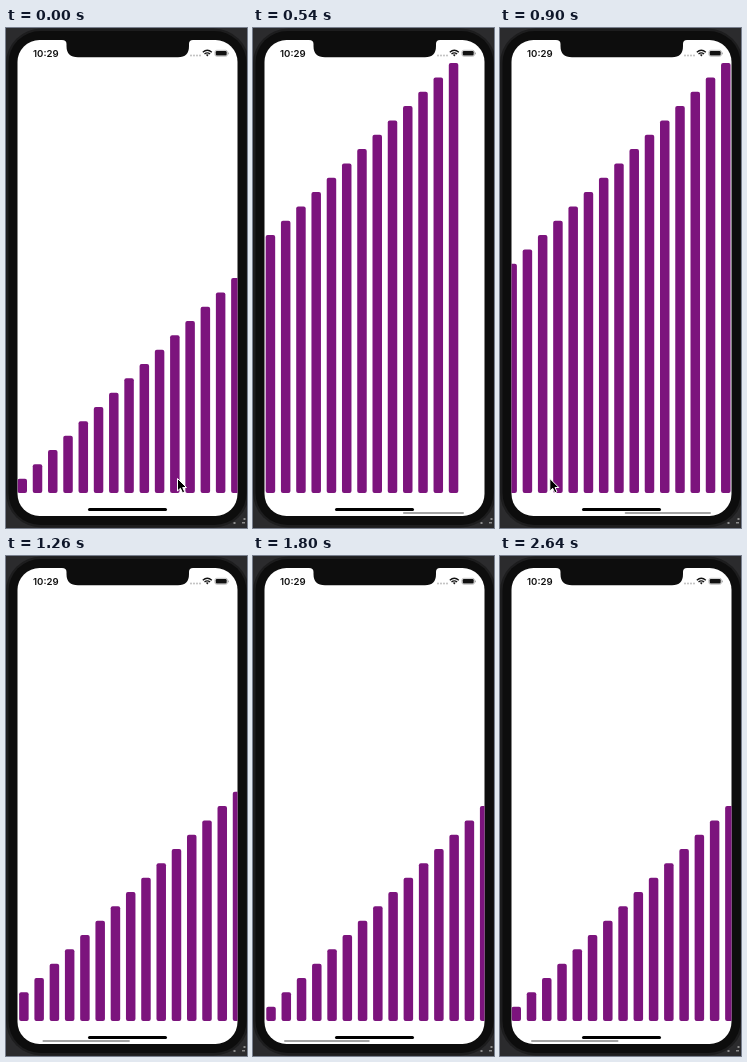
Animation, 241 px wide and 500 px high, one loop 2700 ms. Source, as an HTML page:

```html
<!DOCTYPE html>
<html lang="en">
<head>
<meta charset="utf-8">
<title>Scrolling bar chart</title>
<style>
  html, body { margin: 0; width: 100%; height: 100%; overflow: hidden; background: #2b2b2d; }
  svg { display: block; width: 100%; height: 100%; }
  text { font: 600 9.6px Inter, "Liberation Sans", sans-serif; }
</style>
</head>
<body>
<svg viewBox="0 0 241 500">
  <defs>
    <clipPath id="screen"><rect x="11.5" y="12" width="220" height="476" rx="22"/></clipPath>
  </defs>
  <rect width="241" height="500" fill="#2b2b2d"/>
  <rect x="0" y="0.5" width="243" height="499" rx="35" fill="#1d1d1e"/>
  <rect x="2.5" y="3" width="238" height="494" rx="32" fill="#0d0d0d"/>
  <g fill="#8c8c8c">
    <rect x="227.5" y="494" width="2" height="2"/>
    <rect x="237.5" y="490" width="2" height="2"/>
    <rect x="236" y="494" width="3" height="1.5"/>
  </g>
  <rect x="11.5" y="12" width="220" height="476" rx="22" fill="#fff"/>
  <g clip-path="url(#screen)">
    <g id="bars" fill="#7c147d"></g>
    <rect id="thumb" y="484" height="2" rx="1" fill="#a4a4a4"/>
  </g>
  <path fill="#0d0d0d" d="M56 11H187V12Q183 12 183 16V18Q183 29.3 172 29.3H72Q60.500 29.300 60.500 18V16Q60.500 12 56 12Z"/>
  <text x="27" y="28.6" textLength="" fill="#111">10:29</text>
  <g fill="#b8b8b8">
    <circle cx="185" cy="27.500" r=".9"/><circle cx="188" cy="27.500" r=".9"/>
    <circle cx="191" cy="27.500" r=".9"/><circle cx="194" cy="27.500" r=".9"/>
  </g>
  <g fill="none" stroke="#111" stroke-width="1.4">
    <path d="M196.800 24.200Q201.300 20.400 205.800 24.200"/>
    <path d="M198.500 26Q201.300 23.700 204.100 26"/>
    <path d="M199.900 26.700L201.300 28.600L202.700 26.700Q201.300 25.700 199.900 26.700Z" fill="#111" stroke="none"/>
  </g>
  <rect x="208.900" y="22.300" width="12.600" height="6" rx="1.900" fill="none" stroke="#999" stroke-width=".6"/>
  <rect x="209.700" y="23.100" width="11" height="4.400" rx="1.100" fill="#111"/>
  <rect x="222.200" y="24.300" width=".8" height="2.200" rx=".4" fill="#999"/>
  <rect x="82" y="480" width="79" height="3" rx="1.500" fill="#000"/>
  <path id="cursor" d="M0 0V12.500L2.900 9.800L5 14.300L7.200 13.300L5.200 9H9Z"
        fill="#000" stroke="#fff" stroke-width="1" stroke-linejoin="round"/>
</svg>
<script>
const LOOP = 2700, STEP = 60;
const COUNT = 30, PITCH = 15.26, BAR = 9.5, RISE = 14.33, BASE = 465;
const LEFT = 11.5, VIEW = 220, MAX = 231.8, BOUNCE = 27;
const TRACK_START = 31, TRACK_END = 211, THUMB = 87.5;

const bars = document.getElementById("bars");
const thumb = document.getElementById("thumb");
const cursor = document.getElementById("cursor");

function setAttrs(node, attrs) {
  for (const key in attrs) node.setAttribute(key, attrs[key]);
}

for (let i = 0; i < COUNT; i++) {
  const bar = document.createElementNS("http://www.w3.org/2000/svg", "rect");
  const height = RISE * (i + 1);
  setAttrs(bar, { x: LEFT + i * PITCH, y: BASE - height, width: BAR, height, rx: 2 });
  bars.append(bar);
}

const smooth = u => u * u * (3 - 2 * u);
const mix = (a, b, u) => a + (b - a) * u;

// Critically damped return from the overscrolled edge.
function settle(ms, rate) {
  const x = rate * ms / 1000;
  return BOUNCE * Math.exp(-x) * (1 + x);
}

function scrollAt(t) {
  if (t < 555) return mix(0, MAX + BOUNCE, smooth(t / 555));
  if (t < 900) return MAX + settle(t - 555, 14);
  if (t < 1380) return mix(MAX + 1.2, -BOUNCE, smooth((t - 900) / 480));
  return t > 2040 ? 0 : -settle(t - 1380, 10.5);
}

function draw(t) {
  const scroll = scrollAt(t);
  bars.setAttribute("transform", `translate(${-scroll} 0)`);

  // The thumb shrinks against the track end while overscrolled.
  const over = Math.max(0, -scroll, scroll - MAX);
  const width = THUMB - over;
  const part = Math.min(1, Math.max(0, scroll / MAX));
  setAttrs(thumb, {
    x: mix(TRACK_START, TRACK_END - width, part),
    width,
    visibility: t < STEP ? "hidden" : "visible"
  });

  const second = t >= 900;
  const pressed = second ? t < 1020 : t < 120;
  const x = second ? 51 + MAX - scroll : 171.5 - scroll;
  setAttrs(cursor, {
    transform: `translate(${x} 450.5)`,
    visibility: pressed ? "visible" : "hidden"
  });
}

const start = performance.now();
function tick() {
  const t = (performance.now() - start) % LOOP;
  draw(Math.floor(t / STEP) * STEP);
  requestAnimationFrame(tick);
}
draw(0);
requestAnimationFrame(tick);
</script>
</body>
</html>
```
